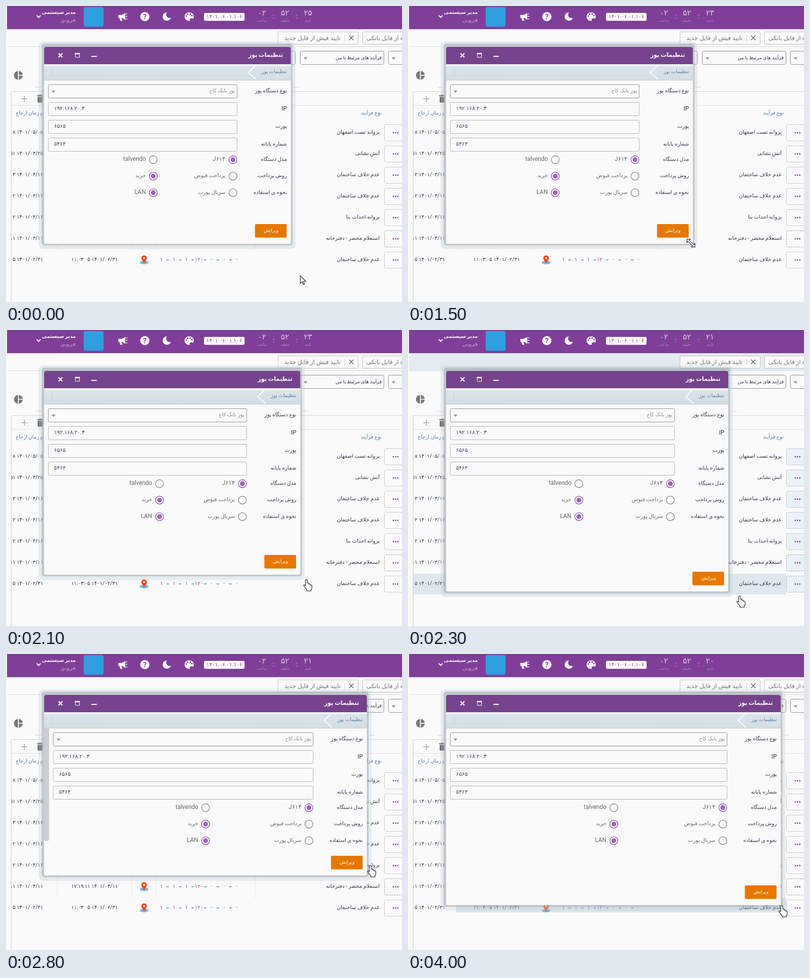
An HTML page with a canvas for the animation above (4200 ms loop, 800x600 px).

```html
<!DOCTYPE html>
<html lang="fa">
<head>
<meta charset="utf-8">
<style>
html, body { margin: 0; width: 100%; height: 100%; overflow: hidden; }
canvas { display: block; }
</style>
</head>
<body>
<canvas id="stage" width="800" height="600"></canvas>
<script>
const ctx = document.getElementById('stage').getContext('2d');
const LOOP = 4200, STEP = 100, MOVE = 500;
const LEFT = 77, TOP = 83;
const PURPLE = '#7f3f98', PAGE = '#fafafa', INK = '#34344a', GRAY = '#757575';

// Key poses; a move into a pose takes at most MOVE ms
const POSES = [
  { at: 0, corner: [575.5, 482], pointer: [594, 546] },
  { at: 700, corner: [575.5, 482], pointer: [563, 472] },
  { at: 2100, corner: [594.5, 496], pointer: [600, 505] },
  { at: 2300, corner: [647, 530], pointer: [663, 538] },
  { at: 2800, corner: [729, 449], pointer: [729, 428] },
  { at: 3300, corner: [732, 437], pointer: [748, 509] },
  { at: 3800, corner: [732, 437], pointer: [748, 509] },
  { at: 4000, corner: [753, 509], pointer: [748, 509] }
];
const TICKS = [300, 1000, 2200, 2300, 3900];

const ARROW = new Path2D('M.5.5v16l3.7-3.6 2.6 5.6 2.4-1-2.5-5.5h5z');
const RESIZE = new Path2D('M.5.5h7L5.2 2.8l9 9 2.3-2.3v7h-7l2.3-2.3-9-9L.5 7.5z');
const HAND = new Path2D('M5 14V3q0-2 2-2t2 2v5q3-1 3 2 3-1 3 2 3-1 3 2v4q0 2-2 4v2H8v-2l-6-8q-2-4 3-1z');

const ROWS = [
  ['پروانه تست اصفهان', '08 1401/05/05'],
  ['آتش نشانی', '51 1401/03/25'],
  ['عدم خلاف ساختمان', '03 1401/03/16'],
  ['عدم خلاف ساختمان', '02 1401/03/16'],
  ['پروانه احداث بنا', '02 1401/03/16'],
  ['استعلام محضر - دفترخانه', '11 1401/03/11', '17:19:'],
  ['عدم خلاف ساختمان', '05 1401/02/31', '11:03:']
];

const fa = s => String(s).replace(/\d/g, d => '۰۱۲۳۴۵۶۷۸۹'[d]);

function pose(part, t) {
  const i = POSES.findIndex(k => k.at > t);
  if (i < 0) return POSES[POSES.length - 1][part];
  const a = POSES[i - 1], b = POSES[i], start = Math.max(a.at, b.at - MOVE);
  const p = Math.max(0, (t - start) / (b.at - start));
  return a[part].map((v, k) => v + (b[part][k] - v) * p);
}

function text(s, x, y, color = INK, size = 10.6, align = 'right', weight = 'normal') {
  ctx.font = `${weight} ${size}px Roboto, "DejaVu Sans", sans-serif`;
  ctx.direction = /[آ-ی]/.test(s) ? 'rtl' : 'ltr';
  ctx.textAlign = align;
  ctx.fillStyle = color;
  ctx.fillText(s, x, y + size * 0.31);
}

function rect(x, y, w, h, color) {
  ctx.fillStyle = color;
  ctx.fillRect(x, y, w, h);
}

function box(x, y, w, h, r, fill, stroke, dash = []) {
  ctx.beginPath();
  ctx.roundRect(x, y, w, h, r);
  if (fill) { ctx.fillStyle = fill; ctx.fill(); }
  if (!stroke) return;
  ctx.setLineDash(dash);
  ctx.strokeStyle = stroke;
  ctx.lineWidth = 1;
  ctx.stroke();
  ctx.setLineDash([]);
}

function trace(p) {
  ctx.beginPath();
  for (let i = 0; i < p.length; i += 2) ctx.lineTo(p[i], p[i + 1]);
}

function line(color, width, ...p) {
  trace(p);
  ctx.strokeStyle = color;
  ctx.lineWidth = width;
  ctx.stroke();
}

function poly(color, ...p) {
  trace(p);
  ctx.fillStyle = color;
  ctx.fill();
}

function dot(x, y, r, color, ry = r) {
  ctx.beginPath();
  ctx.ellipse(x, y, r, ry, 0, 0, 7);
  ctx.fillStyle = color;
  ctx.fill();
}

function cross(x, y, r, color, width) {
  line(color, width, x - r, y - r, x + r, y + r);
  line(color, width, x + r, y - r, x - r, y + r);
}

const caret = (x, y) => poly('#8f8f8f', x - 4, y - 2, x + 4, y - 2, x, y + 2.5);

function topBar(t) {
  rect(2, 0, 798, 47, PURPLE);
  rect(0, 0, 2, 600, '#fdfdee');
  line('#fff', 2, 62, 19, 66, 23, 70, 19);
  text('مدیر سیستمی', 141, 13, '#fff', 9.9, 'right', 'bold');
  text('قزوین', 141, 29, '#b58cc6', 9.9, 'right', 'bold');
  box(157, 2, 40, 40, 4, '#2f9fe0');

  // Megaphone
  poly('#fff', 227, 18, 234, 18, 241, 14, 241, 28, 234, 24, 227, 24);
  poly('#fff', 229, 24, 233, 24, 235, 30, 231, 30);
  for (const k of [-1, 0, 1]) line('#fff', 1.5, 242, 21 + 4 * k, 245, 21 + 6 * k);
  // Help
  dot(280.5, 21.5, 9.3, '#fff');
  text('?', 280.5, 22.3, PURPLE, 14, 'center', 'bold');
  // Moon
  dot(325, 21.5, 8.5, '#fff');
  dot(330.5, 17.5, 7, PURPLE);
  // Palette
  dot(370, 21.5, 9.3, '#fff', 8.8);
  for (let a = 3.3; a < 6.3; a += 0.9) dot(370 + 6 * Math.cos(a), 21 + 5 * Math.sin(a), 1.5, PURPLE);
  dot(375, 28, 4, PURPLE, 3);

  box(400, 14, 82, 16, 3, '#fff');
  text(fa('1401.06.01.106'), 441, 22, PURPLE, 10.8, 'center');

  const sec = 25 - TICKS.filter(at => t >= at).length;
  [['02', 'ساعت'], [52, 'دقیقه'], [sec, 'ثانیه']].forEach(([n, name], i) => {
    const x = 517 + 46.5 * i;
    text(fa(n), x, 14, '#decde7', 15.5, 'center');
    text(name, x, 30, '#b58cc6', 7.7, 'center');
    if (i) text(':', x - 23, 21, '#decde7', 13, 'center');
  });
}

function tabs(tinted) {
  if (tinted) rect(2, 47, 798, 35, '#e3ebf0');
  line('#dcdcdc', 1, 2, 82.5, 800, 82.5);
  box(549.5, 52.5, 162, 25, 2, PAGE, '#bdbdbd');
  text('تایید فیش از فایل جدید', 676, 65, GRAY, 12.3);
  line('#ccc', 1, 684.5, 59, 684.5, 71);
  cross(697.5, 64.5, 4.5, '#555', 1.3);
  box(720.5, 52.5, 90, 25, 2, PAGE, '#bdbdbd');
  text('استفاده از فایل بانکی', 728, 65, GRAY, 12.3, 'left');

  for (const [x, w] of [[500.5, 84], [594.5, 169], [772.5, 40]]) {
    box(x, 91.5, w, 27, 3, PAGE, '#8c8c8c');
    caret(x + 10.5, 106);
  }
  text('فرآیند های مرتبط با من', 759, 105, INK, 9.8);
}

function pin(y) {
  dot(279, y + 6, 9, '#76b5ea', 3.5);
  poly('#f3470f', 273.8, y - 1, 284.2, y - 1, 279, y + 8);
  dot(279, y - 3, 5.6, '#f3470f');
  dot(279, y - 3, 2.1, '#fff');
}

function toolbar() {
  dot(25, 140.5, 9, '#777');
  line(PAGE, 1.8, 25, 131, 25, 150);
  line(PAGE, 1.8, 25, 140.5, 34.5, 140.5);
  line('#aaa', 1.6, 31, 188, 43, 188);
  line('#aaa', 1.6, 37, 182, 37, 194);
  rect(63, 181, 12, 2, '#666');
  rect(66.5, 179.5, 5, 2, '#666');
  box(64, 184, 10, 12, 1.5, '#666');
}

function grid(tinted, t) {
  line('#d0d0d0', 1, 800, 173.5, 10.5, 173.5, 10.5, 600);
  line('#e0e0e0', 1, 11, 201.5, 800, 201.5);
  text('و زمان ارجاع', 74, 217, '#5678ae', 10.2);
  text('نوع فرآیند', 759, 217, '#5678ae', 10.4);
  for (const x of [103.5, 253.5, 303.5, 503.5]) line('#e3e6e8', 1, x, 202, x, 494);

  if (tinted) rect(11, 494, 753, 42, '#e0e8ef');
  if (t >= 4000) rect(97, 494, 667, 30, '#dde6eb');

  ctx.save();
  ctx.beginPath();
  ctx.rect(11, 200, 789, 400);
  ctx.clip();
  ROWS.forEach(([name, date, time], i) => {
    const y = 256 + 43 * i, dashed = i === 5;
    text(name, 755, y);
    text(fa(date), 75, y, INK, 10.4);
    box(764.5, y - 15.5, 50, 33, 3, tinted ? '#e9f2f7' : PAGE, dashed ? '#999' : '#c8c8c8', dashed ? [3, 2] : []);
    for (const k of [-1, 0, 1]) dot(787 + 4.5 * k, y + 1, 1.4, '#7c3c95');
    if (!time) return;
    text(fa(time + date), 226, y, INK, 10.4);
    pin(y);
    '1-1-1-120-0-0-0'.split(/(-)/).forEach((s, k) => {
      const x = 314 + 12.65 * k;
      if (s === '-') rect(x - 2.5, y, 5, 1.4, '#3f83b5');
      else text(fa(s), x, y, k > 6 ? INK : '#8a4aa3', 10.6, 'center');
    });
  });
  ctx.restore();
}

function radio(x, y, on, name) {
  ctx.beginPath();
  ctx.arc(x, y, 8, 0, 7);
  ctx.strokeStyle = on ? '#8b4ba5' : '#858585';
  ctx.lineWidth = 1.3;
  ctx.stroke();
  if (on) dot(x, y, 4.9, '#9c66b2');
  text(name, x - 15, y - 1, '#666', /^[a-z]/i.test(name) ? 12 : 10.7);
}

function fields(R, B) {
  const inner = B < 440, outer = !inner && B < 455;
  const left = inner || outer ? 95.5 : 85.5;
  ctx.save();
  ctx.beginPath();
  ctx.rect(LEFT, 150, R - LEFT, B - 57 - 150);
  ctx.clip();

  const inputs = [['نوع دستگاه پوز', ''], ['IP', '192.168.20.3'], ['پورت', '6565'], ['شماره پایانه', '5464']];
  inputs.forEach(([name, value], i) => {
    const y = 159.5 + 36 * i, x = inner && !i ? 85.5 : left;
    box(x, y, R - 108.5 - x, 27, 2, null, i ? '#b3b3b3' : '#8e8e8e');
    text(name, R - 8, y + 12.5, INK, name === 'IP' ? 12 : 10.5);
    if (i) text(fa(value), x + 11.5, y + 12.5, '#3d4560', 11, 'left');
    else {
      caret(x + 10.5, y + 14);
      text('پوز بانک کاج', R - 113, y + 12.5, '#8b8b8b', 10.5);
    }
  });

  const x2 = (left - 0.5) / 3 + R * 2 / 3 - 114.5;
  const choices = [
    ['مدل دستگاه', fa('J614'), 'talvendo', true],
    ['روش پرداخت', 'پرداخت قبوض', 'خرید', false],
    ['نحوه ی استفاده', 'سریال پورت', 'LAN', false]
  ];
  choices.forEach(([name, a, b, first], i) => {
    const y = 311.5 + 33.4 * i;
    text(name, R - 8, y - 1, INK, 10.5);
    radio(R - 117, y, first, a);
    radio(x2, y, !first, b);
  });
  ctx.restore();

  if (inner) box(85, 195, 10, 175, [0, 0, 4, 4], '#cbcdd0');
  if (outer) box(77, 150, 10, 229, [0, 0, 4, 4], '#cbcdd0');
}

function dialog(R, B) {
  const w = R - LEFT;
  box(66, 72, R - 57, B - 61, 9, 'rgba(186,202,212,.32)');
  box(72, 76, R - 68.5, B - 72.5, 6, 'rgba(150,158,164,.45)');
  for (const [x, y] of [[59, 164.5], [R, 164.5]]) line('#c9ced2', 1, x, y, x + 17, y);
  box(LEFT, TOP, w, B - TOP, [4, 4, 3, 3], PAGE);

  box(LEFT, TOP, w, 35, [4, 4, 0, 0], '#75438b');
  cross(110, 100, 4, '#fff', 2.3);
  box(140, 96, 8.5, 8, 0, null, '#fff');
  rect(139.5, 95, 9.5, 3, '#fff');
  rect(172.5, 101, 11, 2.2, '#fff');
  text('تنظیمات پوز', R - 16, 99, '#fff', 11.6, 'right', 'bold');

  const band = ctx.createLinearGradient(0, 122, 0, 150);
  band.addColorStop(0, '#dbe4e9');
  band.addColorStop(1, '#d3dee5');
  rect(LEFT, 118, w, 4, '#eff3f5');
  rect(LEFT, 122, w, 28, band);
  line('#c5d0d7', 1, 93.5, 124, 93.5, 142);
  line('#fff', 2, R - 72, 121, R - 86, 135, R - 70, 149);
  line('#c5ccd1', 1, LEFT, 150.5, R, 150.5);
  text('تنظیمات پوز', R - 8, 133, '#5f7aa5', 10.2);

  fields(R, B);
  box(R - 72.5, B - 40, 64, 27.5, 2, '#e67700');
  text('ویرایش', R - 40, B - 27, '#fff', 9.7, 'center');
}

function cursor(t) {
  const resizing = (t >= 1500 && t < 1700) || (t >= 3300 && t < 3500);
  const shape = resizing ? RESIZE : t < 1500 ? ARROW : HAND;
  ctx.save();
  ctx.translate(...pose('pointer', t));
  ctx.fillStyle = '#fff';
  ctx.strokeStyle = '#111';
  ctx.lineWidth = 1.1;
  ctx.fill(shape);
  ctx.stroke(shape);
  ctx.restore();
}

function draw(now) {
  const t = Math.floor(now % LOOP / STEP) * STEP;
  const tinted = t >= 2300 && t < 2800;
  rect(0, 0, 800, 600, PAGE);
  topBar(t);
  tabs(tinted);
  toolbar();
  grid(tinted, t);
  dialog(...pose('corner', t));
  cursor(t);
  requestAnimationFrame(draw);
}
requestAnimationFrame(draw);
</script>
</body>
</html>
```
